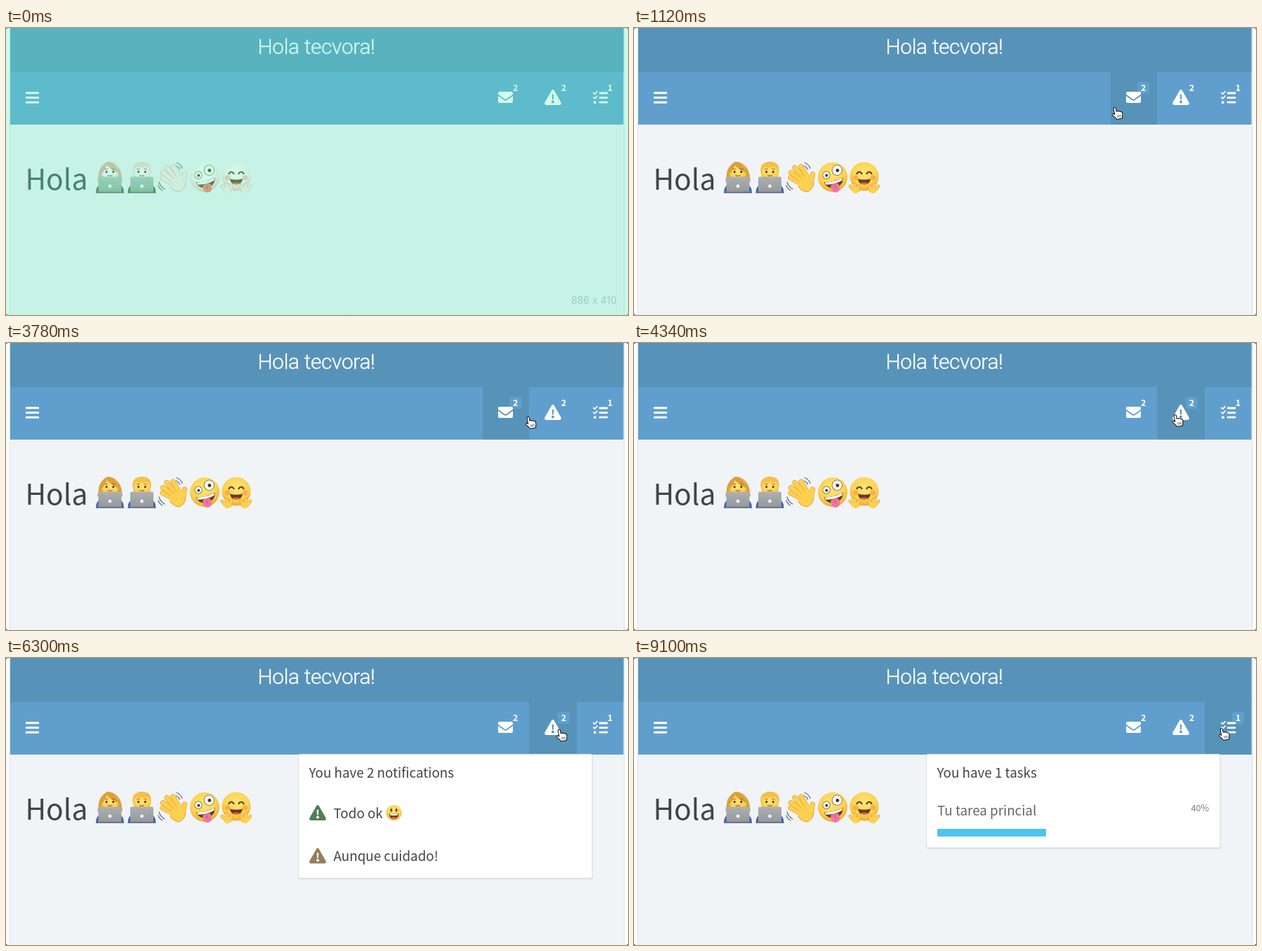
An HTML page for the animation above (9240 ms loop, 886 by 410 pixels).

```html
<!DOCTYPE html>
<html lang="es">
<head>
<meta charset="utf-8">
<title>Dashboard menus</title>
<style>
html, body { margin: 0; width: 100%; height: 100%; overflow: hidden; background: #fff; }
svg { display: block; width: 886px; height: 410px; }
text { font-family: 'Noto Sans CJK JP', 'Noto Sans CJK SC', 'Noto Sans CJK', 'Source Sans Pro', 'Noto Sans', sans-serif; fill: #444; }
.title { font: 300 30px Roboto, Inter, 'Liberation Sans', sans-serif; letter-spacing: -.4px; fill: #fff; stroke: #fff; stroke-width: .35px; }
.size { font: 300 14px Inter, Roboto, sans-serif; letter-spacing: .15px; fill: #a3a9ae; }
.hello { font-size: 40.8px; }
.body { font-size: 18.8px; }
.name { font-size: 20.2px; }
.note { font-size: 16.1px; fill: #999; }
.date { font-size: 13.4px; fill: #999; }
.percent { font-size: 12.6px; fill: #777; }
.badge { font-size: 12.5px; font-weight: 700; fill: #fff; }
</style>
</head>
<body>
<svg viewBox="0 0 886 410">
  <defs>
    <filter id="tint" x="0" y="0" width="886" height="410" filterUnits="userSpaceOnUse" color-interpolation-filters="sRGB">
      <feComponentTransfer>
        <feFuncR type="linear" slope=".72" intercept=".1"/>
        <feFuncG type="linear" slope=".66" intercept=".325"/>
        <feFuncB type="linear" slope=".62" intercept=".3"/>
      </feComponentTransfer>
    </filter>
    <filter id="bleach" x="0" y="0" width="886" height="410" filterUnits="userSpaceOnUse" color-interpolation-filters="sRGB">
      <feColorMatrix values="1 0 0 0 0  0 1.25 0 0 -.1  0 1.7 0 0 -.47  0 0 0 1 0"/>
    </filter>
    <radialGradient id="skin" cx=".5" cy=".38" r=".66">
      <stop offset="0" stop-color="#ffe57a"/>
      <stop offset=".65" stop-color="#fdd251"/>
      <stop offset="1" stop-color="#e9a02f"/>
    </radialGradient>
    <linearGradient id="metal" x2="0" y2="1">
      <stop offset="0" stop-color="#adb0b3"/>
      <stop offset="1" stop-color="#95999c"/>
    </linearGradient>
  </defs>
  <g id="scene"></g>
</svg>
<script>
const LOOP = 9240, STEP = 70;
const HEADER = '#5793b9', NAV = '#609fcd';
const SKIN = '#fdd04f', SHADE = '#dd9a2c', BROWN = '#5f3d1c';
const WARN = 'M10.2 1.2Q12-1 13.8 1.2L23.6 18.6Q24.6 21.5 21.8 22H2.2Q-.6 21.5 .4 18.6ZM10.7 7l.4 7.2h1.8l.4-7.2zM12 15.6a2 2 0 1 0 .01 0z';

const text = (x, y, cls, s, anchor = 'start') =>
  `<text x="${x}" y="${y}" class="${cls}" text-anchor="${anchor}">${s}</text>`;
const rect = (x, y, w, h, fill, rx = 0) =>
  `<rect x="${x}" y="${y}" width="${w}" height="${h}" rx="${rx}" fill="${fill}"/>`;
const path = (d, fill) => `<path d="${d}" fill="${fill}"/>`;
const line = (d, color, w) =>
  `<path d="${d}" fill="none" stroke="${color}" stroke-width="${w}" stroke-linecap="round" stroke-linejoin="round"/>`;
const oval = (x, y, rx, ry, fill) => `<ellipse cx="${x}" cy="${y}" rx="${rx}" ry="${ry}" fill="${fill}"/>`;
const dot = (x, y, r, fill) => oval(x, y, r, r, fill);
const at = (x, y, body, more = '') => `<g transform="translate(${x} ${y})${more}">${body}</g>`;
const warning = (x, y, fill) =>
  `<path transform="translate(${x} ${y})" d="${WARN}" fill="${fill}" fill-rule="evenodd"/>`;

function coder(x, hair, back, fringe) {
  return at(x, 191,
    path('M0 45Q0 35 7 32H33Q40 35 40 45Z', '#3c5fae') +
    path(back, hair) +
    oval(20, 15.5, 12.5, 13, 'url(#skin)') +
    path(fringe, hair) +
    line('M13 10.8q2-1.3 4-.3M23 10.5q2-1 4 .3', '#97651b', 1) +
    oval(15.2, 14.5, 1.4, 1.8, '#4a3420') + oval(24.8, 14.5, 1.4, 1.8, '#4a3420') +
    line('M17 19.4q3 1.6 6 0', '#a85a20', 1.1) +
    rect(3.5, 21.5, 33, 22, 'url(#metal)', 2) +
    rect(2, 42.6, 36, 2, '#7c8084', 1) +
    dot(20, 35, 2.4, '#f1f2f3'));
}

function wavingHand() {
  const fingers = ['M24 32L7 23', 'M25 28L7.5 15.5', 'M28 25L13 8.5', 'M32 24L22 7'];
  const thumb = 'M36 31Q37 25 38.5 18';
  return at(216, 191,
    [...fingers, thumb].map(d => line(d, SHADE, 7.2) + line(d, SKIN, 6)).join('') +
    path('M20 26L31 19Q40 21 40 30Q39 39 31 43Q23 43 17 35Z', SKIN) +
    line('M40 29Q40 39 31 43Q24 43 18 36', SHADE, 1) +
    line('M27 1.5q6 2 8 8M26.5 6q3.5 1.5 5 5M2 29q2 7 8 10M.8 34q2 5 6 7', '#66747e', 1.3));
}

function zanyFace() {
  return at(283, 213,
    dot(0, 0, 21, 'url(#skin)') +
    path('M-14 4Q0 8 14 4Q12 15 0 15.5Q-12 15-14 4Z', BROWN) +
    path('M-13 4.4Q0 8.3 13 4.4L12 8Q0 11.5-12 8Z', '#fff') +
    path('M-6 11Q0 8.5 6 11V17Q5 22.5 0 22.5Q-5 22.5-6 17Z', '#f2759f') +
    line('M0 12v5', '#d44a80', 1) +
    dot(-8, -5, 5.6, '#7a5a2a') + dot(-8, -5, 4.8, '#fff') + dot(-7.8, -4.4, 2, '#4a3420') +
    dot(8.5, -8, 7.6, '#7a5a2a') + dot(8.5, -8, 6.8, '#fff') + dot(9, -7.6, 2.4, '#4a3420'), ' rotate(-14)');
}

function hugFace() {
  const fingers = 'M-15 20l-5-6M-12 19l-2-8M-9 20l2-7';
  const hand = line(fingers, SHADE, 4.8) + line(fingers, SKIN, 3.6) + dot(-12.5, 19.5, 4.8, SKIN);
  return at(328, 212,
    dot(0, 0, 20.5, 'url(#skin)') +
    dot(-12.5, 2, 3.8, '#f8ae4a') + dot(12.5, 2, 3.8, '#f8ae4a') +
    line('M-10.5-4q3.5-5 7 0M3.5-4q3.5-5 7 0', BROWN, 2.2) +
    path('M-9 3.5Q0 6 9 3.5Q8 11.5 0 11.5Q-8 11.5-9 3.5Z', BROWN) +
    path('M-6 9.8Q0 7 6 9.8Q3 11.5 0 11.5Q-3 11.5-6 9.8Z', '#e8585e') +
    hand + `<g transform="scale(-1 1)">${hand}</g>`);
}

function grinFace() {
  return at(552.5, 221,
    dot(0, 0, 11, 'url(#skin)') +
    oval(-3.6, -3.6, 1.4, 2.3, BROWN) + oval(3.6, -3.6, 1.4, 2.3, BROWN) +
    path('M-7 1.2Q0 2.6 7 1.2Q6.4 8.6 0 8.6Q-6.4 8.6-7 1.2Z', BROWN) +
    path('M-6 1.6Q0 2.8 6 1.6L5.4 3.6Q0 4.6-5.4 3.6Z', '#fff') +
    path('M-4 7Q0 4.6 4 7Q2 8.6 0 8.6Q-2 8.6-4 7Z', '#e8585e'));
}

const panel = (id, h, body) =>
  `<g id="${id}">${rect(416, 138, 420, h + 1.5, '#00000012', 3)}` +
  `<rect x="416.5" y="137.5" width="418.5" height="${h}" rx="2" fill="#fff" stroke="#dcdfe1"/>${body}</g>`;
const tab = (id, x, w, badgeX) =>
  `<g id="${id}">${rect(x, 62, w, 76, HEADER)}${rect(badgeX - 8.5, 77, 17, 17, NAV, 3)}</g>`;
const badge = (x, n) => text(x, 90, 'badge', n, 'middle');

const backdrop =
  rect(0, 0, 886, 410, '#3a3f44') + rect(0, 0, 886, 410, '#fafbfc', 3) +
  rect(6, 0, 874, 410, '#f0f4f7') +
  rect(5, 0, 1, 410, '#e0e4e8') + rect(880, 0, 1, 410, '#d9dde1') +
  rect(6, 0, 873.5, 138, NAV) + rect(6, 0, 873.5, 63, HEADER) +
  text(442, 36.5, 'title', 'Hola tecvora!', 'middle');

const navIcons =
  line('M29.3 92.7h16.4M29.3 99.5h16.4M29.3 106.3h16.4', '#fff', 3.1) +
  path('M701 97l8.3 6q2.2 1.5 4.4 0l8.3-6V105q0 2-2 2H703q-2 0-2-2Z', '#fff') +
  path('M703 91h17q2 0 2 2v1.8l-8.9 6.4q-1.6 1.1-3.2 0l-8.9-6.4V93q0-2 2-2Z', '#fff') +
  warning(767, 88, '#fff') +
  line('M846 93h10M846 99.6h10M846 106.2h10', '#fff', 2.8) +
  line('M836.8 92.6l1.8 1.7 3.4-3.7M836.8 99.2l1.8 1.7 3.4-3.7', '#fff', 1.7) +
  dot(838.8, 106.2, 2, '#fff') +
  badge(725.7, 2) + badge(794.4, 2) + badge(860.5, 1);

const emoji =
  coder(128, '#dd9f3a',
    'M18 0C9 3 4 11 4 19L2 28H38L36.5 18C35 9 28 1 18 0Z',
    'M6.5 19Q13 13 15.5 5Q23 13 34 17Q29 2 16 0Q7 5 6.5 19Z') +
  coder(173.5, '#f3c04a',
    'M7 16Q5 1 20 0Q35 1 33 16Z',
    'M7.5 14Q5 2 18 0Q35-1 32.5 14Q31 10 28 7.5Q19 9.5 12 7.5Q9 10 7.5 14Z') +
  wavingHand() + zanyFace() + hugFace();

const messages = panel('messages', 217,
  text(431.5, 171, 'body', 'You have 2 messages') +
  dot(469.5, 217.5, 11.3, '#000') +
  path('M450 246Q450 231 461 231Q469.5 235 478 231Q489 231 489 246V247Q489 251 485 251H454Q450 251 450 247Z', '#000') +
  line('M458.5 299Q462 291.5 470 291.5Q481.5 292.5 481.5 301.5Q481.5 306 475.5 309.5Q470 312.5 470 317', '#000', 7.6) +
  dot(469.6, 327.3, 5.6, '#000') +
  text(514, 227, 'name', 'Marisa') + text(514.5, 250, 'note', 'tecvora') +
  text(514, 309, 'name', 'Otro usuario') + text(514.5, 332, 'note', "Pal' mundo") +
  '<circle cx="728.5" cy="295.5" r="6.2" fill="none" stroke="#999" stroke-width="1.4"/>' +
  line('M728.5 291.8v4l2.4 1.8', '#999', 1.3) +
  text(819, 301, 'date', '17/OCT/2020', 'end'));

const notices = panel('notices', 177,
  text(431.5, 171, 'body', 'You have 2 notifications') +
  warning(432, 210, '#4f8055') + text(466.5, 228.5, 'body', 'Todo ok') + grinFace() +
  warning(432, 271.5, '#957e5b') + text(466.5, 290, 'body', 'Aunque cuidado!'));

const tasks = panel('tasks', 133.5,
  text(431.5, 171, 'body', 'You have 1 tasks') +
  `<g opacity=".82">${text(432, 225, 'body', 'Tu tarea princial')}</g>` +
  text(819, 218.5, 'percent', '40%', 'end') +
  rect(432, 244, 155, 11, '#4fc4ef', 1));

const cursor = '<g id="cursor" stroke-linejoin="round">' +
  '<path id="arrow" d="M0 0V16L3.7 12.6L6 18L8.6 17L6.3 11.6H11Z" fill="#000" stroke="#fff"/>' +
  '<g id="hand" transform="translate(-1.5 -.5) rotate(-10) scale(.95)"><path d="M-1.7 1.6Q-1.6 0 0 0Q1.6 0 1.7 1.6V6.4Q4 5.4 4.6 7Q7 6.2 7.5 8Q10 7.5 10 10.2V13Q9 15 8.6 18.2H.2Q-1 15-4.6 11.6Q-5.8 9.6-4.1 9Q-2.8 8.8-1.7 10.6Z" fill="#fff" stroke="#111" stroke-width="1.1"/>' +
  line('M2.2 12.5v3M4.4 12.5v3M6.6 12.5v3', '#222', .7) + '</g></g>';

const $ = id => document.getElementById(id);
$('scene').innerHTML = backdrop +
  tab('mailTab', 679, 66, 725.7) + tab('warnTab', 745, 68, 794.4) + tab('taskTab', 813, 66.5, 860.5) +
  navIcons + text(27.4, 231, 'hello', 'Hola') + `<g id="emoji">${emoji}</g>` +
  messages + notices + tasks +
  `<g id="size">${text(870, 394, 'size', '886 x 410', 'end')}</g>` + cursor;

// time, x, y of the pointer tip
const track = [
  [0, 484, 408], [70, 484, 408], [910, 686, 114], [2030, 686, 114], [2240, 688, 111],
  [3430, 688, 111], [3780, 745, 106], [4060, 772, 103], [6090, 772, 103], [6720, 838, 101], [LOOP, 838, 101]
];

function pointer(t) {
  const i = track.findIndex(k => k[0] > t);
  const [t0, x0, y0] = track[i - 1], [t1, x1, y1] = track[i];
  const u = (t - t0) / (t1 - t0), e = u * u * (3 - 2 * u);
  return [x0 + (x1 - x0) * e, y0 + (y1 - y0) * e];
}

const show = (id, on) => $(id).setAttribute('visibility', on ? 'visible' : 'hidden');
const filter = (id, name, on) => $(id).setAttribute('filter', on ? `url(#${name})` : 'none');

function draw(t) {
  const [x, y] = pointer(t);
  const onNav = y > 62 && y < 137;
  const over = (a, b) => onNav && x > a && x <= b;
  const mail = t >= 1400 && t < 3290;
  const warn = t >= 4410 && t < 7000;
  const task = t >= 7000;
  show('mailTab', mail || over(679, 745));
  show('warnTab', warn || over(745, 813));
  show('taskTab', task || over(813, 880));
  show('messages', mail);
  show('notices', warn);
  show('tasks', task);
  show('size', t < 560);
  show('hand', over(679, 880));
  show('arrow', !over(679, 880));
  $('cursor').setAttribute('transform', `translate(${x.toFixed(1)} ${y.toFixed(1)})`);
  filter('scene', 'tint', t < STEP);
  filter('emoji', 'bleach', t < STEP);
}

const start = performance.now();
function tick() {
  const t = (performance.now() - start) % LOOP;
  draw(Math.floor(t / STEP) * STEP);
  requestAnimationFrame(tick);
}
tick();
</script>
</body>
</html>
```
